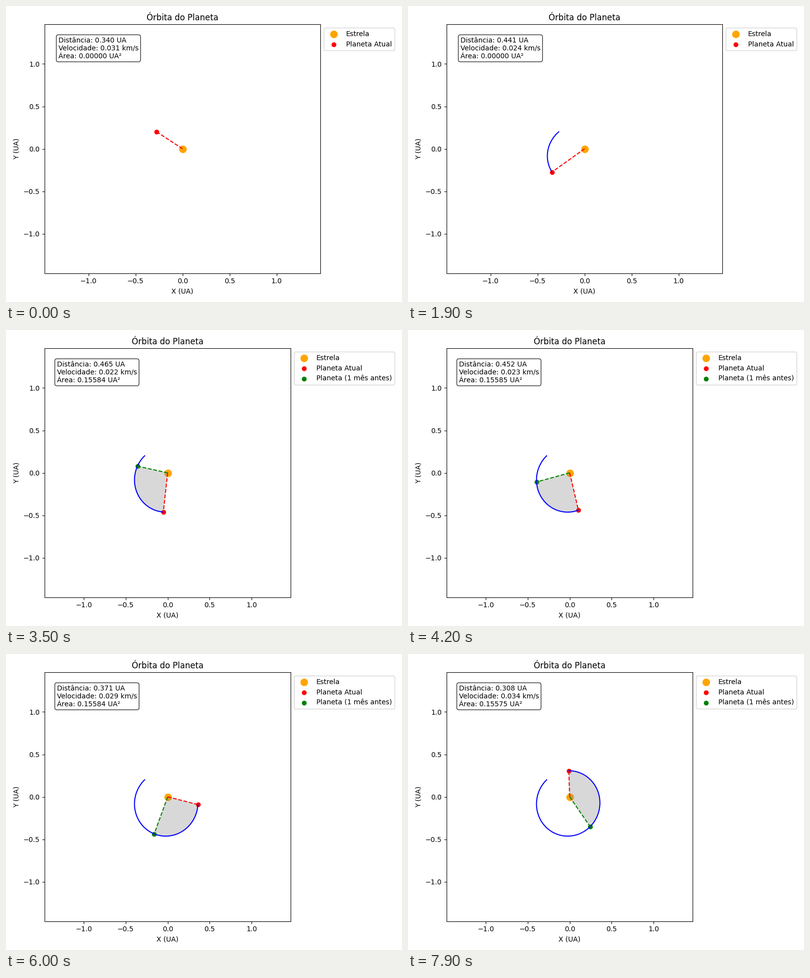
Recreate the animation shown at these times as a matplotlib script. Size 800x600 px, loop 8 s.

```python
import numpy as np
import matplotlib.pyplot as plt
from matplotlib.animation import FuncAnimation

FRAMES, INTERVAL = 80, 100
MONTH = 30  # days, one day per frame

# Orbital elements (AU, radians) and Gaussian constant (AU^1.5 / day)
A, E = 0.387098, 0.205636
INCL, NODE, PERI = np.radians([7.005, 48.331, 29.127])
M0 = np.radians(46.16)
K = 0.01720209895
N = K / A**1.5


def orbit(days):
    """Position and velocity projected on the ecliptic plane."""
    mean = M0 + N * days
    ecc = mean.copy()
    for _ in range(20):
        ecc -= (ecc - E * np.sin(ecc) - mean) / (1 - E * np.cos(ecc))
    b = A * np.sqrt(1 - E * E)
    rate = N / (1 - E * np.cos(ecc))
    pos = np.array([A * (np.cos(ecc) - E), b * np.sin(ecc)])
    vel = np.array([-A * np.sin(ecc), b * np.cos(ecc)]) * rate
    cw, sw = np.cos(PERI), np.sin(PERI)
    cn, sn = np.cos(NODE), np.sin(NODE)
    in_plane = np.array([[cw, -sw], [sw, cw]])
    tilt = np.diag([1, np.cos(INCL)])
    to_ecliptic = np.array([[cn, -sn], [sn, cn]]) @ tilt @ in_plane
    return to_ecliptic @ pos, to_ecliptic @ vel


def shoelace(x, y):
    return 0.5 * abs(np.dot(x, np.roll(y, -1)) - np.dot(y, np.roll(x, -1)))


(X, Y), V = orbit(np.arange(90.0))
DIST = np.hypot(X, Y)
SPEED = np.hypot(*V)
LIMIT = 1 + DIST.max()

plt.rcParams["font.family"] = "DejaVu Sans"
fig, ax = plt.subplots(figsize=(8, 6), dpi=100)


def update(i):
    ax.clear()
    ax.set_xlim(-LIMIT, LIMIT)
    ax.set_ylim(-LIMIT, LIMIT)
    ax.set_title("Órbita do Planeta")
    ax.set_xlabel("X (UA)")
    ax.set_ylabel("Y (UA)")

    ax.scatter(0, 0, s=100, color="orange", label="Estrela")
    ax.plot(X[:i + 1], Y[:i + 1], color="blue")
    ax.scatter(X[i], Y[i], color="red", label="Planeta Atual")
    ax.plot([0, X[i]], [0, Y[i]], "r--")

    area = 0
    if i >= MONTH:
        j = i - MONTH
        ax.scatter(X[j], Y[j], color="green", label="Planeta (1 mês antes)")
        ax.plot([0, X[j]], [0, Y[j]], "g--")
        px, py = np.append(0, X[j:i + 1]), np.append(0, Y[j:i + 1])
        ax.fill(px, py, color="gray", alpha=0.3, linewidth=0)
        area = shoelace(px, py)

    ax.text(0.05, 0.95,
            f"Distância: {DIST[i]:.3f} UA\n"
            f"Velocidade: {SPEED[i]:.3f} km/s\n"
            f"Área: {area:.5f} UA²",
            transform=ax.transAxes, va="top", fontsize=10,
            bbox=dict(boxstyle="round", facecolor="white", alpha=0.8))
    ax.legend(loc="upper left", bbox_to_anchor=(1, 1))

    # The second pass settles the margins whatever the layout was before
    fig.tight_layout()
    fig.tight_layout()


anim = FuncAnimation(fig, update, frames=FRAMES, interval=INTERVAL,
                     init_func=lambda: None, repeat=True, repeat_delay=0)
plt.show()
```
